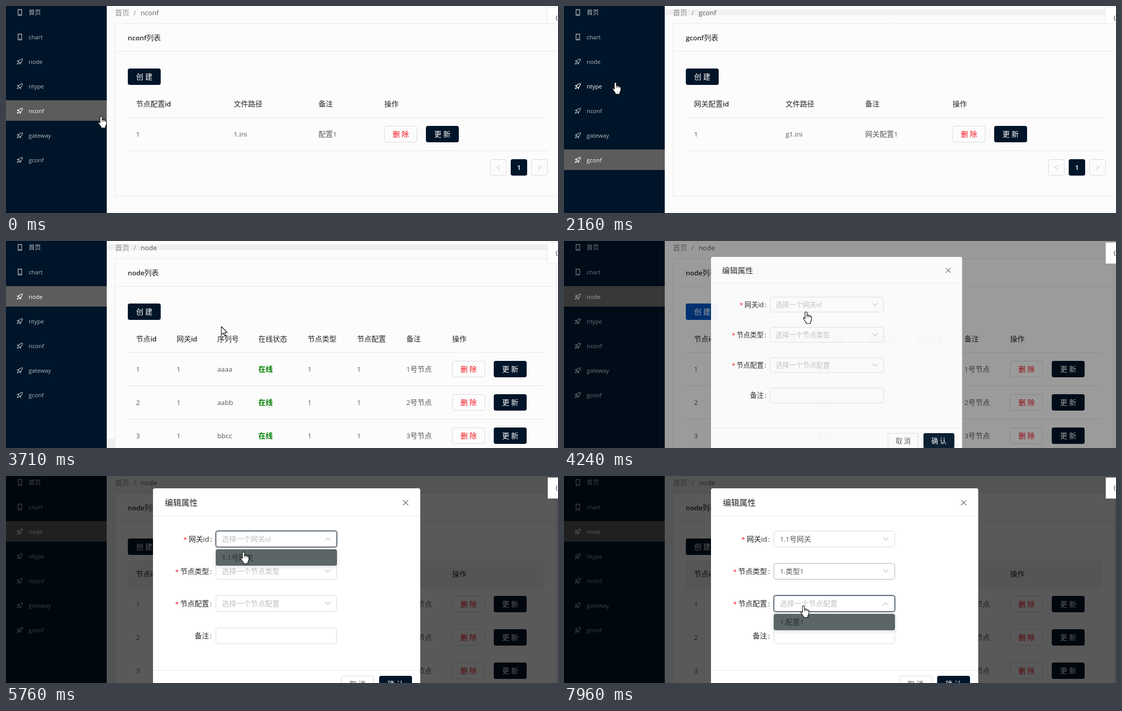
An HTML page with a canvas that plays this animation: 1074 by 404 pixels, repeating every 8000 ms.

```html
<!DOCTYPE html>
<html lang="zh">
<meta charset="utf-8">
<style>
html, body { margin: 0; overflow: hidden; width: 1074px; height: 404px }
canvas { display: block }
</style>
<canvas width="1074" height="404"></canvas>
<script>
const ctx = document.querySelector('canvas').getContext('2d');
const NAVY = '#001529', LINE = '#e8e8e8', EDGE = '#d9d9d9';
const DARK = '#262626', BODY = '#595959', SOFT = '#8c8c8c', HINT = '#bfbfbf';
const LOOP = 8000;

// The picture refreshes in discrete steps: [first, last, count]
const steps = [0];
for (const [a, b, n] of [[150, 1090, 8], [1220, 1220, 1], [1500, 2430, 8], [2570, 3590, 9],
  [3710, 4240, 5], [4360, 4750, 4], [4900, 5480, 5], [5760, 5760, 1], [6040, 6690, 6],
  [6830, 6970, 2], [7100, 7100, 1], [7400, 7960, 5]])
  for (let i = 0; i < n; i++) steps.push(n > 1 ? Math.floor((a + (b - a) * i / (n - 1)) / 10) * 10 : a);

// Pointer path: time, x, y
const path = [[0, 185, 215], [150, 185, 215], [420, 150, 250], [690, 130, 254], [1090, 115, 308],
  [1630, 115, 308], [1900, 108, 268], [2160, 100, 149], [2430, 95, 108], [2700, 95, 108],
  [3080, 839, 247], [3300, 839, 252], [3840, 286, 140], [3970, 286, 140], [4240, 471, 138],
  [4490, 480, 126], [5040, 470, 124], [5480, 462, 148], [5900, 462, 148], [6300, 480, 182],
  [6430, 482, 188], [6690, 485, 207], [6970, 485, 212], [7390, 485, 212], [7660, 470, 245], [7960, 466, 253]];

const menu = ['首页', 'chart', 'node', 'ntype', 'nconf', 'gateway', 'gconf'];
const pages = {
  nconf: { cols: [253, 443, 608, 736], head: ['节点配置id', '文件路径', '备注'], rows: [['1', '1.ini', '配置1']] },
  gateway: { cols: [253, 363, 473, 595, 705, 815], head: ['网关id', '序列号', '在线状态', '网关配置', '备注'],
    rows: [['1', 'abcd', '在线', '1', '1号网关']] },
  gconf: { cols: [253, 431, 586, 756], head: ['网关配置id', '文件路径', '备注'], rows: [['1', 'g1.ini', '网关配置1']] },
  node: { cols: [253, 332, 411, 491, 587, 683, 779, 868], wide: 1046,
    head: ['节点id', '网关id', '序列号', '在线状态', '节点类型', '节点配置', '备注'],
    rows: ['aaaa', 'aabb', 'bbcc'].map((s, i) => [`${i + 1}`, '1', s, '在线', '1', '1', `${i + 1}号节点`]) }
};
const fields = [
  { label: '网关id', value: '1.1号网关', open: 5040, pick: 6040 },
  { label: '节点类型', value: '1.类型1', open: 6430, pick: 6960 },
  { label: '节点配置', value: '1.配置1', open: 7800, pick: LOOP }
];

const clamp = v => Math.max(0, Math.min(1, v));

function pointer(t) {
  const i = path.findIndex(p => p[0] > t);
  if (i < 0) return path[path.length - 1].slice(1);
  const [a, b] = [path[i - 1], path[i]], k = (t - a[0]) / (b[0] - a[0]);
  return [a[1] + (b[1] - a[1]) * k, a[2] + (b[2] - a[2]) * k];
}

function fill(x, y, w, h, color) {
  ctx.fillStyle = color;
  ctx.fillRect(x, y, w, h);
}

function box(x, y, w, h, color, edge, r = 4) {
  ctx.beginPath();
  const o = edge ? .5 : 0;
  ctx.roundRect(x + o, y + o, w - 2 * o, h - 2 * o, r);
  if (color) { ctx.fillStyle = color; ctx.fill(); }
  if (edge) { ctx.strokeStyle = edge; ctx.lineWidth = 1; ctx.stroke(); }
}

function stroke(d, x, y, color, width = 1) {
  ctx.save();
  ctx.translate(x, y);
  ctx.strokeStyle = color;
  ctx.lineWidth = width;
  ctx.stroke(new Path2D(d));
  ctx.restore();
}

// Latin runs are set slightly smaller than the CJK runs; y is the middle of the line
function text(str, x, y, color, { size = 14, weight = 400, align = 0 } = {}) {
  const runs = str.match(/[\x00-\x7f]+|[^\x00-\x7f]+/g).map(s => {
    const font = s.charCodeAt(0) < 128
      ? `${weight} ${size * .945}px "Open Sans", sans-serif`
      : `${weight > 600 ? 700 : 400} ${size}px "Noto Sans CJK SC", "Noto Sans CJK", sans-serif`;
    ctx.font = font;
    return { s, font, w: ctx.measureText(s).width };
  });
  x -= runs.reduce((sum, r) => sum + r.w, 0) * align;
  ctx.fillStyle = color;
  for (const r of runs) {
    ctx.font = r.font;
    ctx.fillText(r.s, x, Math.round(y + size * .36));
    x += r.w;
  }
}

function button(label, x, y, color, edge, ink) {
  box(x, y, 64, 32, color, edge);
  text(label, x + 32, y + 16, ink, { align: .5 });
}

function sidebar(active, [px, py]) {
  fill(0, 0, 196, 404, NAVY);
  menu.forEach((name, i) => {
    const y = 13 + 48 * i, on = name === active;
    if (on) fill(0, y - 21, 196, 40, '#5c5c5c');
    const lit = on || (px < 196 && Math.abs(py - y) < 20);
    const ink = lit ? '#fff' : '#b2b8be';
    if (i < 2) {
      stroke('M-3.5-5.5h7v11h-7zM-1 3.5h2', 27, y - .5, ink, 1.3);
    } else {
      stroke('M5-5Q0-5-3 0L0 3Q5 0 5-5ZM-2-2L-5-1L-3 0M2 2L1 5L0 3M-3 2Q-5 3-5 5Q-3 5-2 3M1.5-1.5h.5', 27, y - .5, ink, 1.2);
    }
    text(name, 44, y, ink, { size: 12 });
  });
}

function content(name, t, [px, py], modal) {
  const { cols, head, rows, wide = 1054 } = pages[name], isNode = name === 'node';
  const settled = t >= 4300, paper = settled ? '#fff' : '#fcfcfc';
  fill(196, 0, 878, 404, settled ? '#f0f2f5' : '#fbfbfb');
  if (t >= 560 && t < 4000) {
    fill(196, 7, 857, 11, '#f0f0f0');
    if (isNode) fill(196, 386, 878, 18, '#f0f0f0');
  }
  text('首页', 212, 13, SOFT);
  text('/', 248, 13, SOFT);
  text(name, 262, 13, BODY);
  box(212, 34, isNode ? 859 : 880, isNode ? 400 : 338, paper, LINE, 1);
  fill(213, 88, isNode ? 857 : 861, 1, LINE);
  text(name + '列表', 237, 62, DARK, { weight: 600 });
  button('创 建', 237, 122, t >= 3840 && t < 4300 ? '#0052b8' : NAVY, null, '#fff');

  if (settled) fill(237, 165, wide - 237, 52, '#f4f4f4');
  [...head, '操作'].forEach((s, i) => text(s, cols[i], 191, DARK, { weight: 600 }));
  fill(237, 217, wide - 237, 1, LINE);
  rows.forEach((row, r) => {
    const y = 250 + 65 * r, act = cols[row.length];
    const hover = !modal && px > 237 && px < wide && py > y - 32 && py < y + 32;
    if (hover) fill(237, y - 32, wide - 237, 64, '#a2a5a7');
    row.forEach((s, i) => s === '在线'
      ? text(s, cols[i], y, '#008000', { weight: 700 })
      : text(s, cols[i], y, hover ? '#404142' : BODY));
    button('删 除', act, y - 16, hover ? '#fff' : paper, EDGE, '#f5121d');
    fill(act + 72, y - 6, 1, 12, LINE);
    button('更 新', act + 81, y - 16, NAVY, null, '#fff');
    fill(237, y + 32, wide - 237, 1, LINE);
  });
  if (!isNode) {
    box(942, 299, 32, 32, paper, EDGE);
    box(982, 299, 32, 32, NAVY);
    box(1022, 299, 32, 32, paper, EDGE);
    stroke('M3-4L-3 0L3 4', 958, 315, HINT);
    stroke('M-3-4L3 0L-3 4', 1038, 315, HINT);
    text('1', 998, 315, '#fff', { weight: 600, align: .5 });
  }
}

function tab(page, modal) {
  if (modal) fill(1054, 3, 20, 41, '#fff');
  else box(1053, 2, 30, page === 'node' ? 43 : 33, '#fff', LINE, 0);
  text('{', 1069, 23, DARK, { size: 12 });
}

function dialog(t) {
  const e = 1 - (1 - clamp((t - 4095) / 200)) ** 2, scale = .2 + .8 * e;
  ctx.save();
  ctx.translate(286, 140);
  ctx.scale(scale, scale);
  ctx.translate(-286, -140);
  ctx.globalAlpha = .4 + .6 * e;
  box(286, 24, 520, 440, '#fff');
  text('编辑属性', 309, 52, DARK, { size: 16, weight: 500 });
  stroke('M-5-5L5 5M5-5L-5 5', 777.5, 52, '#7a7a7a', 1.5);
  fill(286, 78, 520, 1, LINE);
  fill(286, 379, 520, 1, LINE);
  button('取 消', 652, 390, null, EDGE, BODY);
  button('确 认', 726, 390, NAVY, null, '#fff');

  const last = fields.filter(f => t >= f.pick).pop();
  const label = (s, y) => {
    text(s, 395, y, DARK, { align: 1 });
    text(':', 397, y, DARK);
  };
  fields.forEach((f, i) => {
    const y = 123 + 63 * i, open = t >= f.open && t < f.pick, done = t >= f.pick;
    label(f.label, y);
    text('*', i ? 329 : 345, y + 1, '#f5222d');
    if (open) box(406, y - 18, 240, 36, 'rgba(0,21,41,.2)', null, 6);
    box(408, y - 16, 236, 32, open ? '#fff' : null, open ? NAVY : f === last ? '#b0b0b0' : EDGE);
    text(done ? f.value : '选择一个' + f.label, 420, y, done ? BODY : HINT);
    stroke(open ? 'M-5 3L0-2L5 3' : 'M-5-3L0 2L5-3', 626, y, HINT, 1.2);
  });
  label('备注', 312);
  box(408, 296, 236, 32, null, EDGE);

  fields.forEach((f, i) => {
    if (t < f.open || t >= f.pick + 100) return;
    const y = 143 + 63 * i;
    ctx.save();
    ctx.globalAlpha = t < f.pick ? 1 : .5;
    ctx.shadowColor = 'rgba(0,0,0,.15)';
    ctx.shadowBlur = 8;
    ctx.shadowOffsetY = 2;
    box(408, y, 236, 32, '#5c6568');
    ctx.shadowColor = 'transparent';
    text(f.value, 420, y + 16, '#2b2f31');
    ctx.restore();
  });
  ctx.restore();
}

function cursor(t, [x, y]) {
  const arrow = (t >= 2830 && t < 3800) || (t >= 5480 && t < 5760);
  const shape = new Path2D(arrow
    ? 'M0 0V16L4 12.5L6.5 18.5L9 17.5L6.5 11.5H11.5Z'
    : 'M-2 1.5Q0-1 2 1.5V7Q4 5.5 5 7.5Q7 6.5 8 8.5Q10.5 8 10.5 11V16L8.5 20V23H0V21L-5 14Q-6 11-3.5 11.5L-2 13.5Z');
  ctx.save();
  ctx.translate(Math.round(x), Math.round(y));
  ctx.fillStyle = '#fff';
  ctx.strokeStyle = '#000';
  ctx.lineWidth = 1.1;
  ctx.lineJoin = 'round';
  ctx.fill(shape);
  ctx.stroke(shape);
  if (!arrow) stroke('M2 7V11M5 8V11M8 9V11', 0, 0, '#000', .9);
  ctx.restore();
}

function draw(now) {
  const time = now % LOOP, t = steps.filter(s => s <= time).pop();
  const p = pointer(t), modal = t >= 4100;
  const active = t < 420 ? 'nconf' : t < 1500 ? 'gateway' : t < 2570 ? 'gconf' : 'node';
  const page = t < 560 ? 'nconf' : t < 1630 ? 'gateway' : t < 2570 ? 'gconf' : 'node';
  content(page, t, p, modal);
  sidebar(active, modal ? [999, 0] : p);
  if (modal) {
    fill(0, 0, 1074, 404, `rgba(0,0,0,${.65 * clamp((t - 4060) / 300)})`);
    dialog(t);
  }
  tab(page, modal);
  cursor(t, p);
  requestAnimationFrame(draw);
}
requestAnimationFrame(draw);
</script>
</html>
```
